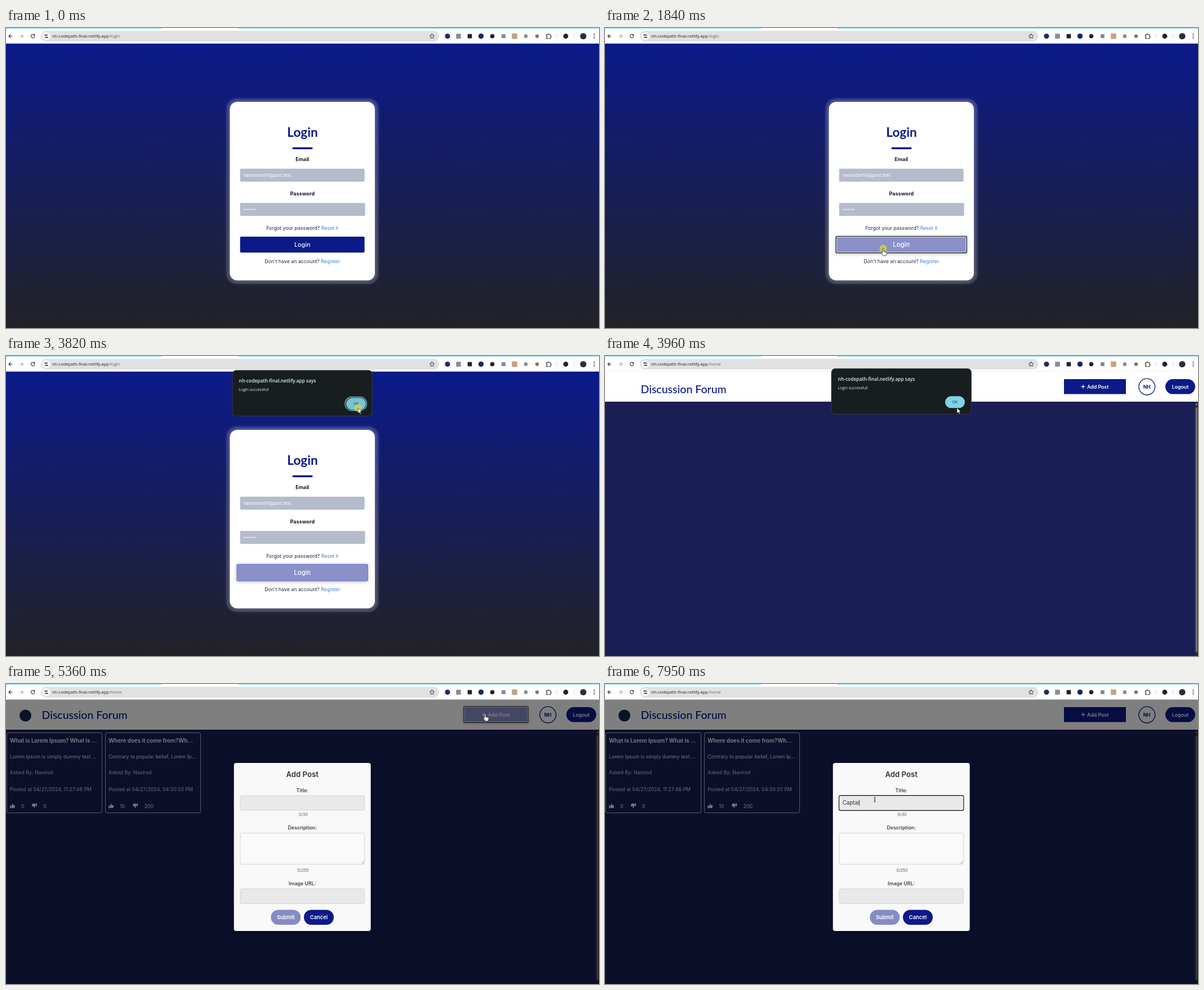
These frames come from a looping animation (1053 px wide and 532 px high, 8 s). An HTML page:

```html
<!DOCTYPE html>
<html lang="en">
<head>
<meta charset="utf-8">
<title>Discussion Forum</title>
<style>
html, body { margin: 0; width: 100%; height: 100%; overflow: hidden; background: #fff; }
svg { display: block; width: 100%; height: 100%; }
text { font: 8.78px Inter, sans-serif; }
.mid { text-anchor: middle; }
.ui { font: 7.5px "Open Sans", sans-serif; }
.label { font-size: 9.1px; font-weight: 700; fill: #1b1b2b; }
.field { fill: #b4bbca; }
.link { fill: #3f84dc; }
.button { font-weight: 600; fill: #fff; }
.navy { fill: #0b1a88; }
.heading { font: 500 19.5px Lato, sans-serif; fill: #0b1a88; }
.formLabel { font-weight: 600; fill: #444; }
.count { font-size: 7.1px; fill: #555; }
.input { fill: #e9e9e9; stroke: #ccc; stroke-width: .8; }
.line { fill: none; stroke: #333; stroke-width: 1.1; stroke-linecap: round; stroke-linejoin: round; }
</style>
</head>
<body>
<svg viewBox="0 0 1053 532" preserveAspectRatio="none">
  <defs>
    <linearGradient id="sky" x2="0" y2="1">
      <stop stop-color="#0b1a8a"/><stop offset="1" stop-color="#222226"/>
    </linearGradient>
    <filter id="glow" x="-20%" y="-20%" width="140%" height="140%"><feGaussianBlur stdDeviation="4"/></filter>
    <path id="thumb" transform="scale(.58)" d="M0 7h4v8H0z M5 7l3-6c2 0 2 1.5 1.2 5h5.3c1.5 0 1.6 2 .6 2.4.9.8.5 2.2-.4 2.4.5.9 0 2-.8 2 .2 1-.4 1.8-1.6 1.8H8c-1.5 0-2-.6-3-1z"/>
  </defs>

  <g id="loginPage">
    <rect y="27" width="1053" height="505" fill="url(#sky)"/>
    <rect x="391" y="125" width="271" height="329" rx="18" fill="#fff" opacity=".09"/>
    <rect x="396" y="129" width="261" height="321" rx="14" fill="#fff" opacity=".3" filter="url(#glow)"/>
    <rect x="397.5" y="131" width="257.5" height="316.5" rx="13" fill="#fff"/>
    <text class="mid navy" x="526.5" y="193" style="font:700 22.6px Lato,sans-serif">Login</text>
    <rect class="navy" x="508.5" y="211.5" width="36" height="3.5" rx="1.7"/>
    <text class="mid label" x="526.3" y="235.5">Email</text>
    <rect class="field" x="415.7" y="249.5" width="221" height="23" rx="2"/>
    <text x="421.7" y="263.5" fill="#fff" style="font-size:7.7px">navirodon58@post.test</text>
    <text class="mid label" x="526.3" y="296.5">Password</text>
    <rect class="field" x="415.7" y="310.3" width="222" height="23" rx="2"/>
    <path d="M423 321.7h20" stroke="#fff" stroke-width="2" stroke-linecap="round" stroke-dasharray="0 3.15"/>
    <text class="mid" x="526.3" y="358" fill="#222a44">Forgot your password? <tspan class="link">Reset it</tspan></text>
    <g id="loginButton">
      <rect class="face" x="415.7" y="370" width="221" height="28.2" rx="2"/>
      <g class="ring" fill="none">
        <rect x="415.9" y="370.3" width="220.6" height="27.6" rx="2" stroke="#111"/>
        <rect x="417" y="371.2" width="218.4" height="25.8" rx="1.5" stroke="#fff" stroke-width=".8"/>
      </g>
      <text class="mid" x="526.2" y="388" fill="#fff" style="font-size:10.7px;font-weight:500">Login</text>
    </g>
    <text class="mid" x="526.3" y="417" fill="#222a44">Don't have an account? <tspan class="link">Register</tspan></text>
  </g>

  <g id="homePage">
    <rect y="27" width="1053" height="505" fill="#191e55"/>
    <rect y="27" width="1053" height="54" fill="#fff"/>
    <circle id="logo" cx="34.5" cy="56" r="10.5" fill="#15294f"/>
    <text id="heading" class="heading" x="63.5" y="61.5">Discussion Forum</text>
    <g id="addButton">
      <rect class="face" x="815" y="41" width="110" height="26.5"/>
      <g class="ring" fill="none">
        <rect x="814" y="40.2" width="112" height="28" rx="1" stroke="#111"/>
        <rect x="815.2" y="41.4" width="109.6" height="25.6" stroke="#fff" stroke-width=".8"/>
      </g>
      <path d="M845.5 54.3h7m-3.5-3.5v7" stroke="#fff" stroke-width="1.2"/>
      <text class="button" x="856" y="57.5">Add Post</text>
    </g>
    <circle cx="962.3" cy="54.6" r="14.4" fill="#fff" stroke="#0b1a88" stroke-width="1.3"/>
    <text class="mid navy" x="962.3" y="57.8" style="font-size:8.6px;font-weight:700">NH</text>
    <rect class="navy" x="995" y="41" width="53" height="26.6" rx="13.3"/>
    <text class="mid button" x="1021.5" y="57.7">Logout</text>
    <rect x="1047.5" y="81" width="5.5" height="451" fill="#2d2d2f"/>
    <path d="M1050.3 84l2 3h-4z" fill="#999"/>
    <rect x="1048.5" y="91" width="3.8" height="434" rx="1.9" fill="#6c6c6c"/>
    <g id="cards" fill="#eceef6"></g>

    <g id="modal">
      <rect y="27" width="1053" height="505" opacity=".5"/>
      <rect x="405" y="142" width="243" height="298" rx="5" opacity=".4" filter="url(#glow)"/>
      <rect x="404.7" y="140" width="243" height="298" rx="4" fill="#f9f9f9"/>
      <text class="mid" x="526.2" y="165.2" fill="#333" style="font-size:13.16px;font-weight:600">Add Post</text>
      <text class="mid formLabel" x="526.2" y="192">Title:</text>
      <rect class="input" x="415.9" y="198" width="220.7" height="26" rx="2.5"/>
      <rect id="focus" x="415.5" y="197.6" width="221.5" height="26.8" rx="3" fill="none" stroke="#111" stroke-width="1.1"/>
      <text id="typed" x="421.7" y="214.3" fill="#333" style="font-size:9.8px"></text>
      <path id="caret" d="M0 205.5v11" stroke="#222" stroke-width=".7"/>
      <text id="count" class="mid count" x="527.7" y="234"></text>
      <text class="mid formLabel" x="526.2" y="258">Description:</text>
      <rect class="input" x="415.9" y="264.4" width="220.7" height="55.3" rx="2.5" style="fill:#fafafa"/>
      <path d="M631 318.5l4.5-4.5m-2 4.5l2-2" stroke="#777" stroke-width=".7"/>
      <text class="mid count" x="527.5" y="332.8">0/250</text>
      <text class="mid formLabel" x="526.2" y="357">Image URL:</text>
      <rect class="input" x="415.9" y="363.3" width="220.7" height="26" rx="2.5"/>
      <rect x="470.3" y="400.5" width="53" height="26.5" rx="13.2" fill="#858cc3"/>
      <text class="mid button" x="496.8" y="416.7" style="font-size:9.3px">Submit</text>
      <rect class="navy" x="529" y="400.5" width="53" height="26.5" rx="13.2"/>
      <text class="mid button" x="555.5" y="416.7" style="font-size:9.4px">Cancel</text>
    </g>
  </g>

  <g id="browser">
    <rect width="1053" height="27.5" fill="#fff"/>
    <path d="M0 .9h277m135 0h641" stroke="#b5e6f3" stroke-width="1.8"/>
    <path d="M0 27.3h1053" stroke="#ddd" stroke-width=".5"/>
    <rect x="62" y="5" width="707.5" height="19" rx="9.5" fill="#e1e1e2"/>
    <circle cx="71.5" cy="14.5" r="6.8" fill="#fff"/>
    <path class="line" d="M11 14.5H5m3-3l-3 3 3 3M50.4 12.7a3.2 3.2 0 1 0 .4 2.4M50.8 11v2.2h-2.2"/>
    <path class="line" style="stroke:#aaa" d="M24.5 14.5h6m-3-3l3 3-3 3"/>
    <path class="line" d="M68.5 12.5h1m2.5 0h2.5m-6 4H71m2.5 0h1"/>
    <circle cx="70.6" cy="12.5" r="1" class="line"/><circle cx="72.4" cy="16.5" r="1" class="line"/>
    <path class="line" style="stroke-width:.9" d="M756.5 10.2l1.3 2.8 3 .3-2.3 2 .7 3-2.7-1.6-2.7 1.6.7-3-2.3-2 3-.3z"/>
    <text class="ui" x="82" y="17.2" fill="#222">nh-codepath-final.netlify.app<tspan id="path" fill="#666"></tspan></text>
    <g id="extensions"></g>
    <path class="line" d="M959.5 12h2.3c-.5-2.4 2.9-2.4 2.4 0h2.8v2.4c1.7-.3 1.7 2.6 0 2.3v2.1h-7.5v-2.2c2 0 2-2.4 0-2.4z"/>
    <path d="M978 10v9m31-9v9" stroke="#b9dff0"/>
    <path d="M1044.5 11v8" stroke="#333" stroke-width="2" stroke-linecap="round" stroke-dasharray="0 3.5"/>
  </g>

  <g id="alert">
    <rect x="402" y="25.3" width="248.5" height="81" rx="7" fill="#181e20" stroke="#3b4143" stroke-width=".8"/>
    <text class="ui" x="413.6" y="46.5" fill="#dcecef" style="font-size:8.4px;font-weight:600">nh-codepath-final.netlify.app says</text>
    <text class="ui" x="413.6" y="62.4" fill="#e6e8e8" style="font-size:6.8px">Login successful!</text>
    <rect id="okRing" x="602" y="72.7" width="38.5" height="24" rx="12" fill="none" stroke="#7fd3e6" stroke-width="1.2"/>
    <rect id="okFace" x="604" y="74.3" width="35" height="21" rx="10.5"/>
    <text class="mid ui" x="621.4" y="87.2" fill="#123d48" style="font-size:7px">OK</text>
  </g>

  <g id="cursor">
    <circle id="halo" r="6.6" fill="#d8d33c" opacity=".78"/>
    <path id="arrow" d="M0 0v9.6l2.2-2 1.6 3.6 1.6-.7-1.6-3.5h3z" fill="#fff" stroke="#222" stroke-width=".7"/>
    <path id="hand" d="M-1.2 1.3c0-1.6 2.2-1.6 2.2 0v4l4.2 1.2c1 .3 1.2 1 1 2l-.6 3c-.2.9-.6 1.3-1.4 1.3H.8c-.8 0-1.2-.3-1.6-1l-2.4-4c-.6-1 .6-1.8 1.4-1l.6.7z" fill="#fff" stroke="#222" stroke-width=".8"/>
    <path id="beam" d="M-2-4c1 0 2 .3 2 1v6c0 .7-1 1-2 1M2-4c-1 0-2 .3-2 1v6c0 .7 1 1 2 1" fill="none" stroke="#333" stroke-width=".8"/>
  </g>
</svg>
<script>
const LOOP = 8000, STEP = 66;
const $ = id => document.getElementById(id);
const show = (el, on) => { el.style.display = on ? '' : 'none'; };
const ramp = (t, a, b) => Math.min(1, Math.max(0, (t - a) / (b - a)));
const within = (t, a, b) => t >= a && t < b;

const thumb = (x, flip) =>
  `<use href="#thumb" transform="translate(${flip ? x + 9 : x} ${flip ? 220.5 : 211.5})${flip ? ' rotate(180)' : ''}"/>`;
const card = (x, title, body, posted, up, down, downX, countX) => `<g transform="translate(${x})">
  <rect x="1.4" y="86.5" width="169" height="142" rx="2.5" fill="none" stroke="#c9ccdb" stroke-width=".9"/>
  <text x="7" y="103.5" style="font-size:9.7px;font-weight:700">${title}</text>
  <text x="7" y="131.5">${body}</text>
  <text x="7" y="160" opacity=".88">Asked By: Navirod</text>
  <text x="7" y="189.7" opacity=".88">Posted at ${posted}</text>
  ${thumb(7)}<text x="27" y="219.5">${up}</text>
  ${thumb(downX, true)}<text x="${countX}" y="219.5">${down}</text></g>`;
$('cards').innerHTML =
  card(0, 'What is Lorem Ipsum? What is ...', 'Lorem Ipsum is simply dummy text ...', '04/27/2024, 11:27:46 PM', 0, 0, 46, 66) +
  card(175.2, 'Where does it come from?Wh...', 'Contrary to popular belief, Lorem Ip...', '04/27/2024, 04:30:20 PM', 10, 200, 50, 70.5);

// x, colour, radius, corner radius
$('extensions').innerHTML = [
  [784, '#1d2c66', 4.6, 5], [803.5, '#8b8d94', 4.3, 0], [823.5, '#222', 3.8, 0], [843.5, '#16246b', 4.7, 5],
  [863.5, '#222', 3.8, 4], [883.5, '#7c88a6', 3.4, 0], [903, '#c5a27c', 4.8, 0], [923, '#8b9097', 3.4, 4],
  [943, '#96705f', 3.2, 4], [994, '#222', 4.4, 5], [1025, '#26303f', 5.6, 6],
].map(([x, fill, r, rx]) =>
  `<rect x="${x - r}" y="${14.5 - r}" width="${2 * r}" height="${2 * r}" rx="${rx}" fill="${fill}"/>`).join('');

// start, number of steps, x, y, shape on arrival
const MOVES = [
  [450, 3, 465, 352, 'beam'], [780, 3, 404, 228, 'arrow'], [1110, 3, 495, 296, 'arrow'],
  [1440, 4, 494, 391, 'hand'], [2890, 2, 571, 153, 'arrow'], [3230, 7, 625, 92, 'arrow'],
  [4430, 1, 558, 86, 'arrow'], [4500, 4, 778, 47, 'arrow'], [4890, 3, 851, 53, 'hand'],
  [5500, 3, 572, 170, 'arrow'], [5700, 1, 490, 237, 'arrow'], [6030, 1, 490, 234, 'arrow'],
  [6095, 2, 479, 205, 'beam'],
];
const CLICKS = [[1840, 2110], [3820, 3960], [5230, 5360], [6300, 6560]];
const TITLE = 'Captai', KEYS = [6830, 7030, 7090, 7620, 7890, 7950];

function cursorAt(t) {
  let at = { x: 915, y: 474, shape: 'arrow' };
  for (const [start, steps, x, y, shape] of MOVES) {
    if (t < start) break;
    const p = Math.min(1, (Math.floor((t - start) / STEP) + 1) / steps);
    at = { x: at.x + (x - at.x) * p, y: at.y + (y - at.y) * p, shape: p === 1 ? shape : 'arrow' };
  }
  return at;
}

function drawButton(el, cx, cy, grow, hover, ring) {
  const scale = 1 + grow * hover, face = el.querySelector('.face');
  el.setAttribute('transform', `translate(${cx} ${cy}) scale(${scale}) translate(${-cx} ${-cy})`);
  face.style.fill = `color-mix(in srgb, #8a90c8 ${hover * 100}%, #0b1a88)`;
  face.style.stroke = `rgba(112, 120, 224, ${hover})`;
  face.style.filter = hover ? `drop-shadow(0 1px 3px rgba(0, 0, 0, ${.25 * hover}))` : 'none';
  show(el.querySelector('.ring'), ring);
}

function draw(t) {
  const home = t >= 3960;
  show($('loginPage'), !home);
  show($('homePage'), home);
  $('path').textContent = home ? '/home' : '/login';
  drawButton($('loginButton'), 526.2, 384.1, .052, ramp(t, 1570, 1775), within(t, 1840, 2110));

  const rise = t < 3960 ? -9 * (1 - ramp(t, 2245, 2500)) : t < 4030 ? -3 : -14;
  show($('alert'), within(t, 2310, 4090));
  $('alert').setAttribute('transform', `translate(0 ${rise})`);
  $('alert').style.opacity = t < 4030 ? ramp(t, 2245, 2500) : .3;
  show($('okRing'), !home);
  $('okFace').style.fill = within(t, 3560, 3960) ? '#78c4d4' : '#7fd3e6';

  show($('cards'), t >= 4090);
  show($('logo'), t >= 4290);
  $('heading').setAttribute('y', t < 4290 ? 65.5 : 61.5);
  const addHover = ramp(t, 4960, 5160) - ramp(t, 5360, 5560);
  drawButton($('addButton'), 870, 54.2, .02, addHover, within(t, 5230, 6300));

  show($('modal'), t >= 5360);
  show($('focus'), t >= 6300);
  show($('caret'), t >= 6300);
  const typed = KEYS.filter(k => t >= k).length;
  $('typed').textContent = TITLE.slice(0, typed);
  $('count').textContent = typed + '/30';
  const width = typed && home ? $('typed').getComputedTextLength() : 0;
  $('caret').setAttribute('transform', `translate(${422 + width} 0)`);

  const { x, y, shape } = cursorAt(t);
  show($('cursor'), t >= 450);
  $('cursor').setAttribute('transform', `translate(${x} ${y})`);
  for (const s of ['arrow', 'hand', 'beam']) show($(s), s === shape);
  show($('halo'), CLICKS.some(([a, b]) => within(t, a, b)));
}

const begin = performance.now();
function tick() {
  draw((performance.now() - begin) % LOOP);
  requestAnimationFrame(tick);
}
tick();
</script>
</body>
</html>
```
